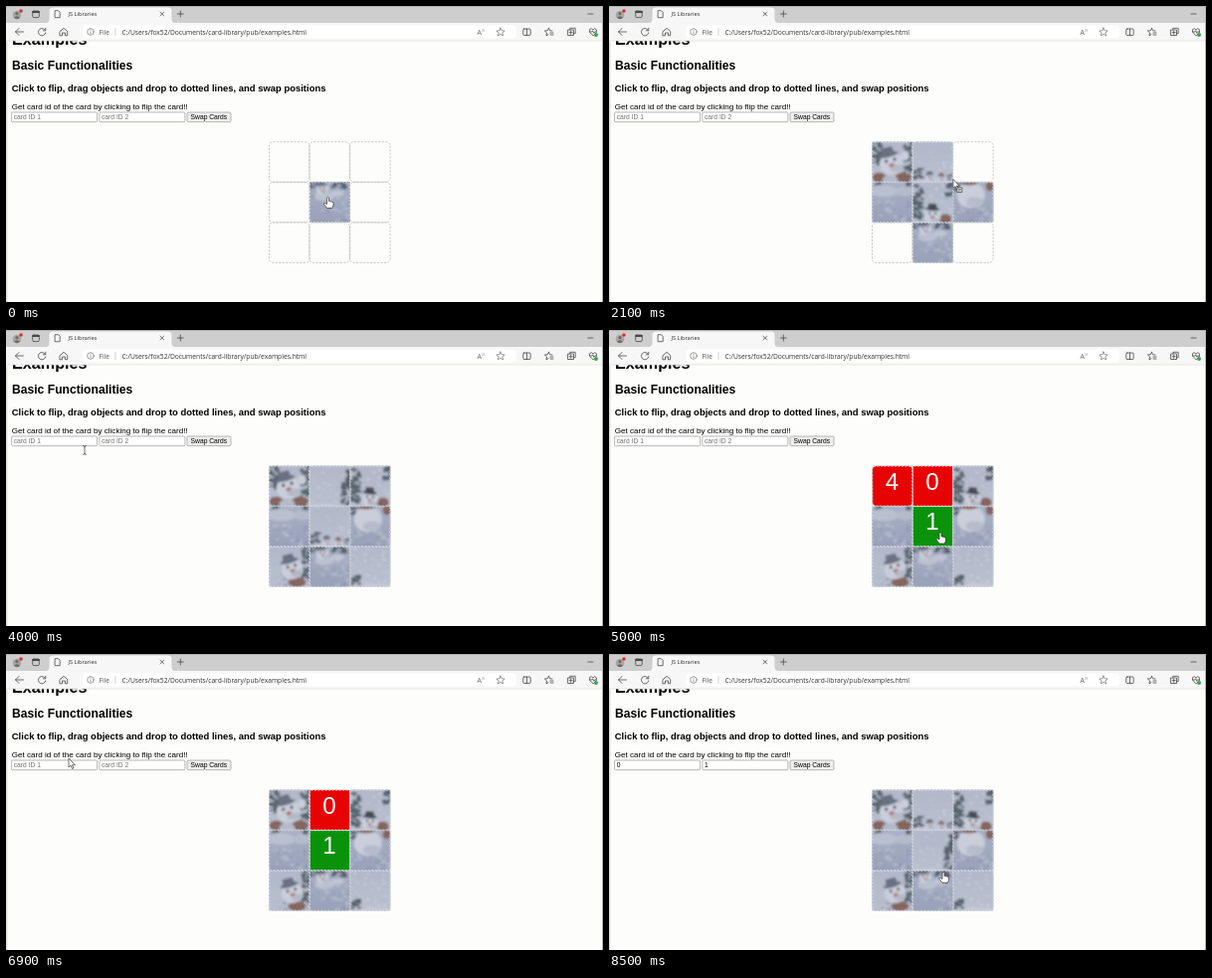
An HTML page that plays this animation: 600 px wide and 298 px high, repeating every 8.6 s.

```html
<!DOCTYPE html>
<html lang="en">
<head>
<meta charset="utf-8">
<title>JS Libraries</title>
<style>
  html, body { margin: 0; width: 100%; height: 100%; overflow: hidden; background: #fdfdfc; }
  #stage { display: block; width: 600px; height: 298px; }
  .ui { font-family: "Open Sans", "Noto Sans", sans-serif; font-size: 6.7px; fill: #303030; }
  .page { font-family: "Liberation Sans", Arial, sans-serif; font-size: 8.09px; fill: #000; }
  .bold { font-weight: bold; }
  .field { font-size: 6.72px; }
  .line { fill: none; stroke: #484848; stroke-width: .8; stroke-linecap: round; stroke-linejoin: round; }
  .thin { stroke: #666; stroke-width: .65; }
  .dash { fill: none; stroke-width: .8; stroke-dasharray: 2.2 1.3; }
  .number { font: 24.2px "Liberation Sans", Arial, sans-serif; fill: #fff; text-anchor: middle; }
</style>
</head>
<body>
<svg id="stage" viewBox="0 0 600 298" xmlns="http://www.w3.org/2000/svg">
  <defs>
    <linearGradient id="sky" x2="0" y2="1"><stop stop-color="#b0b8c9"/><stop offset="1" stop-color="#bac0cf"/></linearGradient>
    <linearGradient id="snow" x2="0" y2="1"><stop stop-color="#aab2c5"/><stop offset="1" stop-color="#979fb8"/></linearGradient>
    <filter id="soft"><feGaussianBlur stdDeviation=".9"/></filter>
  </defs>
  <rect width="600" height="298" fill="#fdfdfc"/>

  <g class="page">
    <text class="bold" x="6" y="39.3" font-size="16.18">Examples</text>
    <text class="bold" x="6" y="64" font-size="12.14">Basic Functionalities</text>
    <text class="bold" x="5.8" y="85.800" font-size="9.46">Click to flip, drag objects and drop to dotted lines, and swap positions</text>
    <text x="5.8" y="104.1">Get card id of the card by clicking to flip the card!!</text>
    <g fill="#fff" stroke="#9a9a9a" stroke-width=".7">
      <rect x="5.6" y="107" width="86" height="9.700" rx="1"/>
      <rect x="93.900" y="107" width="86" height="9.700" rx="1"/>
      <rect x="182" y="107" width="44" height="9.700" rx="1.3" fill="#efefef"/>
    </g>
    <text class="field" id="first" x="7.700" y="114.1"></text>
    <text class="field" id="second" x="96" y="114.1"></text>
    <text class="field" x="185.600" y="114.1">Swap Cards</text>
  </g>

  <rect width="600" height="35" fill="#f7f7f7"/>
  <path d="M0 0H600V17H170Q166.500 17 166.500 13V5Q166.500 1.500 163 1.500H47Q43.500 1.500 43.500 5V13Q43.500 17 40 17H0Z" fill="#cecece"/>
  <path d="M0 35H600" stroke="#dedede" stroke-width=".7"/>
  <path d="M.8 36V298" stroke="#d6d6d6" stroke-width="1.2"/>
  <path d="M0 .5H599.500V298" fill="none" stroke="#b4b4b4"/>

  <circle cx="11" cy="9" r="4.300" fill="#a8a5a3"/>
  <circle cx="11" cy="7.700" r="1.600" fill="#6f6b69"/>
  <path d="M7.900 11.800Q11 8.600 14.100 11.800Q11 14.600 7.900 11.800" fill="#6f6b69"/>
  <circle cx="15" cy="5" r="1.800" fill="#d92b35"/>
  <g class="line">
    <rect x="26.700" y="5" width="6.600" height="6.600" rx="1.200"/><path d="M27 6H33" stroke-width="2"/>
    <path d="M49.500 4.700H52.500L54.200 6.400V11.700H49.500Z"/>
    <path d="M155 6.200L158.600 9.800M158.600 6.200L155 9.800"/>
    <path d="M172.300 8H178.300M175.300 5V11"/>
    <path d="M585 8H590"/>
    <path d="M17.500 26H9.500M13 22.500L9.500 26L13 29.500"/>
    <path d="M39.500 24.500A3.700 3.700 0 1 0 39.800 27M39.800 22.300V24.800H37.300"/>
    <path d="M54.300 25.500L58 22.300L61.700 25.500V29.800H59.500V27H56.500V29.800H54.300Z"/>
  </g>
  <rect x="77" y="19.500" width="436" height="13" rx="4" fill="#fff"/>
  <g class="line thin">
    <circle cx="85" cy="26" r="3.300"/><path d="M85 25.700V27.700M85 24.200V24.300"/>
    <path d="M110 22.500V29.500" style="stroke:#bbb"/>
    <path id="star" d="M497 22L498.200 24.700L501.100 25L498.900 27L499.600 29.900L497 28.400L494.400 29.900L495.100 27L492.900 25L495.800 24.700Z"/>
  </g>
  <g class="line">
    <rect x="519.800" y="23" width="7.400" height="6.500" rx="1"/><path d="M523.500 23V29.500"/>
    <path d="M545.500 22.300L546.500 24.800L549 25M545.500 22.300L544.300 24.700L541.400 25L543.600 27L542.900 29.900L545 28.700M547 27H550M547 29H550"/>
    <path d="M565 24H570.500V29.500H565ZM566.800 24V22.300H572.200V27.700H570.500M567.700 25.300V28.200M566.200 26.700H569.200"/>
    <path d="M590 29.800L586.500 26.200Q585.500 23 588.300 22.700L590 24L591.700 22.700Q594.500 23 593.500 26.200ZM586.700 26H588.700L589.700 24.800L590.700 27.300L591.400 26H593"/>
  </g>
  <circle cx="593" cy="29" r="2" fill="#36a84b"/>
  <g class="ui">
    <text x="62.400" y="10.400" font-size="5.700">JS Libraries</text>
    <text x="93.500" y="28.500" fill="#555">File</text>
    <text x="116.500" y="28.500">C:/Users/fox52/Documents/card-library/pub/examples.html</text>
    <text x="473.500" y="28.700" font-size="7" fill="#666">A</text><text x="478.300" y="25.700" font-size="4" fill="#666">))</text>
  </g>

  <g id="grid"></g>
  <g id="cards"></g>
  <g id="cursor" stroke="#222" stroke-width=".65" stroke-linejoin="round"></g>
</svg>
<script>
const LOOP = 8600, CELL = 40.6, LEFT = 264.5, TOP = 136.8, CENTRE = 4;
const byId = id => document.getElementById(id);
const cellPos = cell => [LEFT + cell % 3 * CELL, TOP + Math.floor(cell / 3) * CELL];

let seed = 7;
const random = () => (seed = seed * 16807 % 2147483647) / 2147483647;

// Soft picture parts, in the 41 px space of one card
const PINE = '#55616b', WHITE = '#c9ceda', SCARF = '#85655f', HAT = '#6b7182';
const blob = (x, y, rx, ry, fill) => `<ellipse cx="${x}" cy="${y}" rx="${rx}" ry="${ry}" fill="${fill}"/>`;
const base = name => `<rect x="-4" y="-4" width="49" height="49" fill="url(#${name})"/>`;
const specks = (count, left, top, width, height, fill, size) => Array.from({ length: count }, () =>
  blob(left + random() * width, top + random() * height, size * (.5 + random()), size * (.4 + random() * .6), fill)).join('');
const drift = y => specks(18, 0, y, 41, 41 - y, '#b3bacb', 2) + specks(10, 0, y, 41, 41 - y, '#8c95b1', 1.6);
const flakes = () => specks(16, 0, 0, 41, 38, '#d8dde6', .9);
const boughs = (x, y, w, h) => specks(Math.ceil(w * h / 7), x, y, w, h, PINE, 1.9);
const snowman = (x, y, size, tilt, hat = HAT) => `<g transform="translate(${x} ${y}) rotate(${tilt}) scale(${size})">
  ${blob(0, 1, 14, 13, WHITE)}${blob(5, 8, 8, 4, '#b4bac9')}${blob(-1, -10, 12, 3, hat)}
  <path d="M-9 -10L-8 -19H5L7 -10Z" fill="${hat}"/>
  ${blob(-5, -3, 1.7, 2, '#3c414c')}${blob(5, -3, 1.7, 2, '#3c414c')}${blob(0, 3, 3.4, 2, '#a9726a')}</g>`;

const pictures = {
  body: base('snow') + drift(14) + boughs(0, 0, 7, 5) + boughs(23, 0, 14, 6) + blob(15, 14, 10, 5, '#bac1d0') + snowman(13, 7, .45, -8) + blob(28, 11, 7, 3, '#bfc5d3'),
  hill: base('snow') + boughs(2, 0, 9, 3) + boughs(29, 0, 9, 3) + blob(12, 9, 15, 6, '#b9c0cf') + blob(33, 9, 9, 5, '#b4bbcb') + drift(18),
  belly: base('snow') + drift(25) + boughs(0, 0, 5, 9) + blob(18, 13, 14, 13, WHITE) + blob(22, 20, 9, 5, '#b6bccb') + blob(16, 1, 9, 2, SCARF) + blob(37, 4, 4, 5, SCARF),
  face: base('sky') + boughs(0, 0, 10, 24) + boughs(32, 0, 9, 41) + blob(7, 36, 7, 5, SCARF) + blob(31, 36, 8, 5, SCARF) + blob(33, 14, 4, 5, WHITE) + snowman(19, 21, .85, -14) + blob(18, 38, 8, 4, '#b4bac9'),
  friends: base('sky') + flakes() + boughs(2, 27, 8, 12) + boughs(35, 33, 5, 8) + blob(20, 41, 23, 4, '#c2c8d4') + snowman(18, 36, .35, -6) + snowman(29, 37, .3, 5, SCARF),
  hat: base('sky') + flakes() + boughs(0, 2, 10, 35) + boughs(33, 0, 8, 14) + blob(33, 37, 6, 5, SCARF) + snowman(20, 33, .6, 5, '#474b56'),
  smile: base('sky') + boughs(33, 0, 8, 37) + drift(29) + blob(28, 36, 9, 5, SCARF) + snowman(23, 22, .78, -15),
  storm: base('sky') + flakes() + flakes() + boughs(2, 28, 8, 12) + blob(26, 41, 20, 4, '#c2c8d4'),
  pine: base('sky') + flakes() + boughs(36, 2, 6, 17) + boughs(32, 17, 10, 22) + blob(14, 41, 18, 3, '#c2c8d4')
};
const backs = { face: [4, '#e80303'], pine: [0, '#e80303'], friends: [1, '#0b920b'] };

// [pick, drop, card, cell]; the pile sits in the centre with the first card on top
const deals = [
  [100, 300, 'body', 7], [500, 700, 'hill', 3], [900, 1100, 'belly', 5], [1200, 1600, 'face', 0],
  [1700, 1900, 'friends', 1], [2000, 2200, 'hat', 2], [2300, 2500, 'smile', 6], [2600, 2800, 'storm', 8]
];
const moves = [
  ...deals.map(([, drop, card, cell]) => [drop, card, cell]),
  [3400, 'pine', 1], [3400, 'friends', CENTRE], [7900, 'pine', CENTRE], [7900, 'friends', 1]
];
const flips = { face: [4500, 5700], pine: [4700, 7900], friends: [4900, 7900] };
const typing = { first: [7200, 'card ID 1', '0'], second: [7600, 'card ID 2', '1'] };

// [time, x, y, shape until the next step]
const path = [
  [0, 323.500, 192, 'hand'], [1400, 328, 151, 'drag'],
  [2900, 339, 199, 'hand'], [3000, 334, 196, 'drag'], [3400, 326, 155, 'hand'],
  [3600, 270, 142, 'arrow'], [4000, 79, 121, 'beam'], [4200, 90, 118, 'arrow'],
  [4500, 286, 158, 'hand'], [4700, 326, 158, 'hand'], [4900, 333, 203.500, 'hand'], [5300, 333, 203.500, 'hand'],
  [5700, 289, 160, 'hand'], [6100, 324, 160, 'hand'], [6400, 322, 164, 'hand'], [6600, 250, 145, 'arrow'],
  [6900, 63, 105, 'arrow'], [7000, 50, 112, 'beam'], [7200, 50, 112, 'beam'], [7400, 135, 112, 'beam'],
  [7600, 135, 112, 'beam'], [7800, 204, 112, 'arrow'], [8000, 204, 112, 'arrow'],
  [8200, 336, 219, 'hand'], [LOOP, 336, 219, 'hand']
];
for (const [pick, drop, , cell] of deals) {
  const [x, y] = cellPos(cell);
  path.push([pick, 324, 194, 'drag'], [drop, x + 22, y + 18, 'hand']);
}
path.sort((a, b) => a[0] - b[0]);

const arrow = '<path fill="#fff" d="M0 0V9L2.100 7.200L3.500 10.500L5 9.900L3.600 6.700H6.400Z"/>';
const cursors = {
  arrow,
  drag: arrow + '<rect x="4" y="8.500" width="5" height="4.500" fill="#fff"/><path d="M5 10H8M5 11.500H8"/>',
  hand: '<path fill="#fff" d="M-1 1Q0 -.7 1 1V4.500Q2 3.800 2.800 5Q3.800 4.400 4.300 5.500Q5.500 5.200 5.500 6.500V8.500L4.300 11.500H-1L-4 7.500Q-4 5.700 -2.400 6.600L-1 7.600Z"/>',
  beam: '<path fill="none" d="M-1.800 -4.500Q0 -4.500 0 -3.300Q0 -4.500 1.800 -4.500M0 -3.500V3.500M-1.800 4.500Q0 4.500 0 3.300Q0 4.500 1.800 4.500"/>'
};

byId('grid').innerHTML = Array.from({ length: 9 }, (_, cell) => {
  const [x, y] = cellPos(cell);
  return `<rect class="dash" x="${x}" y="${y}" width="40.400" height="40.400" rx="4" stroke="#bcbcbc"/>`;
}).join('');

byId('cards').innerHTML = Object.keys(pictures).reverse().map(name => {
  const [id, color] = backs[name] || [];
  const back = color ? `<g id="${name}-back"><rect width="41" height="41" fill="#fdfdfc"/>
    <rect x=".3" y=".3" width="40" height="40" rx="${id === 4 ? 4 : 1}" fill="${color}"/>
    <text class="number" x="20" y="23.800">${id}</text></g>` : '';
  return `<svg id="${name}" width="40.600" height="40.600"><g filter="url(#soft)">${pictures[name]}</g>
    ${back}<rect class="dash" x=".3" y=".3" width="40" height="40" rx="1" stroke="#dfe1e6"/></svg>`;
}).join('');

function drawCursor(time) {
  const next = path.findIndex(step => step[0] > time);
  const [t0, x0, y0, shape] = path[next - 1], [t1, x1, y1] = path[next];
  const p = (time - t0) / (t1 - t0), ease = p * p * (3 - 2 * p);
  const cursor = byId('cursor');
  cursor.setAttribute('transform', `translate(${x0 + (x1 - x0) * ease} ${y0 + (y1 - y0) * ease})`);
  if (cursor.dataset.shape !== shape) {
    cursor.dataset.shape = shape;
    cursor.innerHTML = cursors[shape];
  }
}

function draw(time) {
  for (const name in pictures) {
    const last = moves.filter(([at, card]) => card === name && at <= time).pop();
    const [x, y] = cellPos(last ? last[2] : CENTRE);
    byId(name).setAttribute('x', x);
    byId(name).setAttribute('y', y);
  }
  for (const name in flips) {
    const [from, to] = flips[name];
    byId(name + '-back').style.display = time >= from && time < to ? '' : 'none';
  }
  for (const id in typing) {
    const [at, hint, value] = typing[id], field = byId(id);
    field.textContent = time < at ? hint : value;
    field.style.fill = time < at ? '#757575' : '#000';
  }
  drawCursor(time);
}

const start = performance.now();
function tick() {
  const time = (performance.now() - start) % LOOP;
  draw(Math.floor(time / 100) * 100);
  requestAnimationFrame(tick);
}
tick();
</script>
</body>
</html>
```
